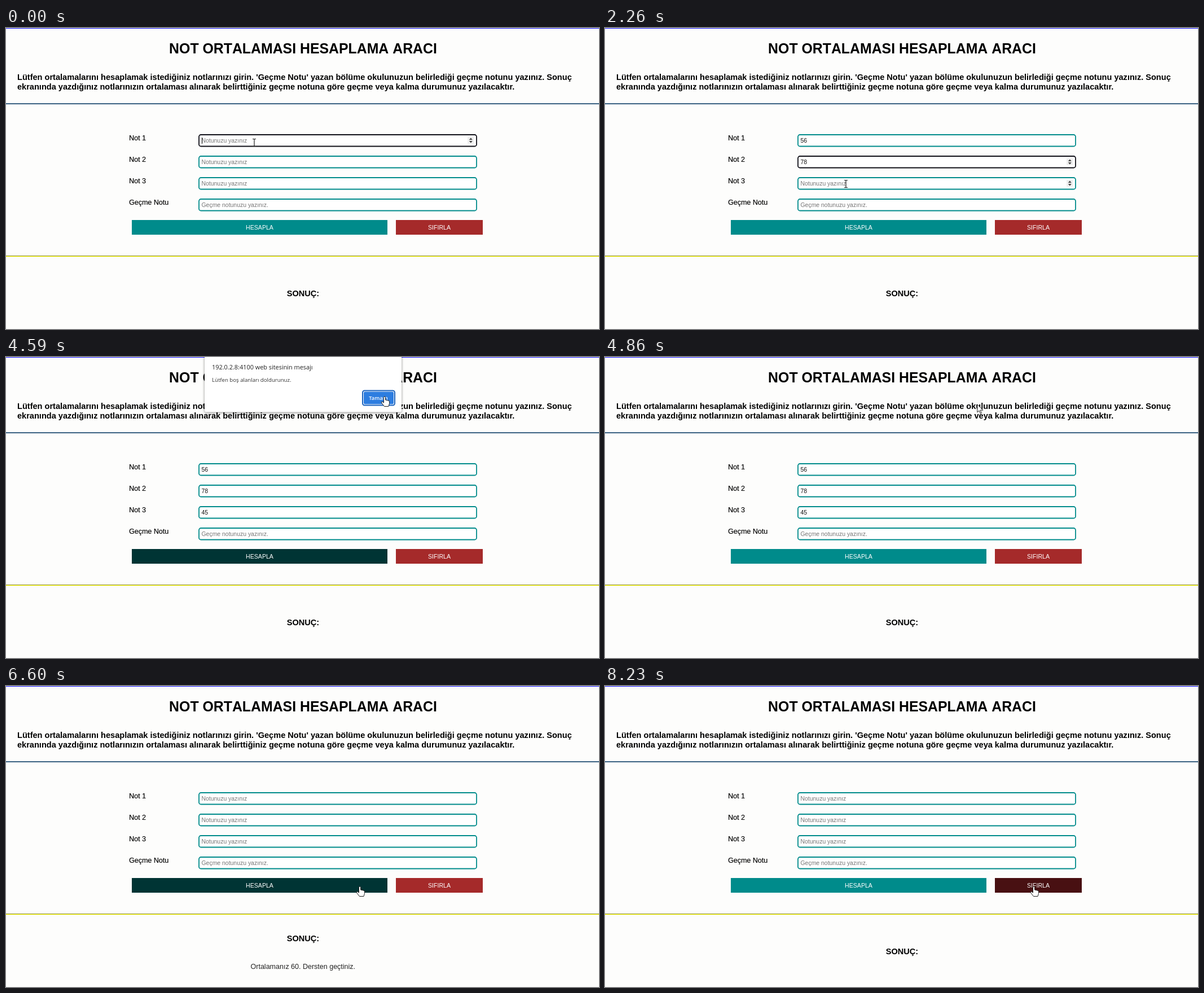
These frames come from a looping animation (1051 by 533 pixels, 8.34 s). An HTML page:

```html
<!DOCTYPE html>
<html lang="tr">
<head>
<meta charset="utf-8">
<style>
  html, body { margin: 0; width: 100%; height: 100%; overflow: hidden; background: #fdfdfc; }
  svg { display: block; font-family: "Liberation Sans", Arial, sans-serif; }
  h1, .bold { font-weight: bold; }
  .title { font-size: 24.85px; font-kerning: none; }
  .lead { font-size: 14.57px; }
  .body { font-size: 12.5px; }
  .label { text-shadow: .4px .4px .5px #0006; }
  .input { font-size: 10.45px; }
  .button { font-size: 10.6px; fill: #fff; }
  .mid { text-anchor: middle; }
  .dialog { font-family: "Open Sans", "Noto Sans", sans-serif; }
</style>
</head>
<body>
<svg width="1051" height="533" viewBox="0 0 1051 533">
  <rect width="1051" height="1" fill="#1414ff"/>
  <text class="title bold mid" x="526.5" y="45">NOT ORTALAMASI HESAPLAMA ARACI</text>
  <g class="lead bold">
    <text x="20" y="92">Lütfen ortalamalarını hesaplamak istediğiniz notlarınızı girin. 'Geçme Notu' yazan bölüme okulunuzun belirlediği geçme notunu yazınız. Sonuç</text>
    <text x="20" y="109">ekranında yazdığınız notlarınızın ortalaması alınarak belirttiğiniz geçme notuna göre geçme veya kalma durumunuz yazılacaktır.</text>
    <text id="heading" class="mid" x="526.5" y="475">SONUÇ:</text>
  </g>
  <rect y="133.4" width="1051" height="1.6" fill="#0b3c66"/>
  <g id="rows"></g>
  <rect id="calc" x="223" y="340" width="453" height="26"/>
  <rect id="reset" x="691" y="340" width="154" height="26"/>
  <text class="button mid" x="449.5" y="356.6">HESAPLA</text>
  <text class="button mid" x="768" y="356.6">SIFIRLA</text>
  <rect y="403" width="1051" height="1" fill="#8c8c46"/>
  <rect y="404" width="1051" height="1" fill="#ff0"/>
  <text id="result" class="body mid" x="526.3" y="500.5" fill="#222">Ortalamanız 60. Dersten geçtiniz.</text>
  <g id="dialog" class="dialog">
    <rect x="352" y="-8" width="349" height="105.5" rx="3" fill="#fff" style="filter:drop-shadow(0 1px 2px #0007)"/>
    <text x="365" y="22" font-size="10.9" fill="#222">192.0.2.8:4100 web sitesinin mesajı</text>
    <text x="365" y="43.5" font-size="9.65" fill="#333">Lütfen boş alanları doldurunuz.</text>
    <rect x="632" y="59.5" width="57" height="26" rx="3.5" fill="#fff" stroke="#1b62bd" stroke-width="2"/>
    <rect x="634" y="61.5" width="53" height="22" rx="2" fill="#2d7de0"/>
    <text class="mid" x="660" y="76" font-size="9.4" font-weight="600" fill="#fff">Tamam</text>
  </g>
  <path id="pointer" stroke-linejoin="round"/>
</svg>
<script>
const LOOP = 8340;
const $ = id => document.getElementById(id);
const show = (el, on) => el.setAttribute('visibility', on ? 'visible' : 'hidden');
const DIGIT = 10.45 * .556;

// [time, field, digit]
const KEYS = [[260, 0, 5], [520, 0, 6], [1450, 1, 7], [1710, 1, 8],
              [2770, 2, 4], [3020, 2, 5], [5850, 3, 5], [5940, 3, 0]];
// [time, focused field or -1]
const FOCUS = [[0, 0], [1110, 1], [2340, 2], [3580, -1], [5420, 3], [6320, -1]];
// [start, end, x, y, steps]
const MOVES = [[600, 1030, 434, 240, 5], [1800, 2260, 427, 276, 5], [3100, 3490, 482, 345, 5],
               [3950, 4590, 671, 70, 7], [4780, 5340, 470, 322, 7], [6010, 6170, 482, 347, 2],
               [6420, 6600, 627, 355, 2], [6690, 6830, 760, 355, 2]];
const ALERT = [3860, 4680, 4780], SUBMIT = 6320, RESET = 7420;

const CURSORS = {
  beam: ['M-3 -6.5H-1Q0 -6.5 0 -5.5Q0 -6.5 1 -6.5H3M0 -5.5V5.5M-3 6.5H-1Q0 6.5 0 5.5Q0 6.5 1 6.5H3', 'none', '#222', 1.2],
  hand: ['M-1.5 9V1.5a1.5 1.5 0 0 1 3 0V6l5.5 1.2q1.5 .4 1.5 2v3.3L7 17.5H-.5L-5.5 11q-.5-2 1.3-2l2.7 2z', '#fff', '#222', 1],
  arrow: ['M0 0V14l3.2-3 2.3 5 2-1-2.2-4.8H10Z', '#fff', '#222', 1]
};

const rows = ['Not 1', 'Not 2', 'Not 3', 'Geçme Notu'].map((label, i) => {
  const hint = i < 3 ? 'Notunuzu yazınız' : 'Geçme notunuzu yazınız.';
  const g = document.createElementNS('http://www.w3.org/2000/svg', 'g');
  g.setAttribute('transform', `translate(0 ${i * 38})`);
  g.innerHTML = `
    <text class="body label" x="218" y="199">${label}</text>
    <rect x="342" y="189" width="492" height="20.5" rx="3.5" fill="#fff" stroke-width="1.8"/>
    <text class="input" x="346.5" y="203"></text>
    <path d="M0 194V205" stroke="#000"/>
    <g><rect x="818" y="193" width="11.5" height="12" fill="#efefef"/>
    <path d="M820.8 198L823.8 194.6L826.8 198ZM820.8 200L823.8 203.4L826.8 200Z" fill="#444"/></g>`;
  const [, box, text, caret, spinner] = g.children;
  $('rows').append(g);
  return { hint, box, text, caret, spinner };
});

function pointerAt(t) {
  let x = 440, y = 203;
  for (const [start, end, toX, toY, steps] of MOVES) {
    if (t < start) break;
    const p = Math.min(1, Math.floor((t - start) / (end - start) * steps + .001) / steps);
    const e = p * p * (3 - 2 * p);
    x += (toX - x) * e;
    y += (toY - y) * e;
  }
  return [x, y];
}

const inside = (x, y, left, top, w, h) => x >= left && x <= left + w && y >= top && y <= top + h;

function render(t) {
  const [x, y] = pointerAt(t);
  const modal = t >= ALERT[0] && t < ALERT[1];
  const [focusTime, focus] = FOCUS.filter(f => f[0] <= t).pop();
  let hoveredField = false;

  rows.forEach((row, i) => {
    const typed = KEYS.filter(k => k[1] === i && k[0] <= t);
    const value = t < SUBMIT ? typed.map(k => k[2]).join('') : '';
    const focused = focus === i;
    const hovered = !modal && inside(x, y, 341, 188 + i * 38, 494, 23);
    const lastInput = typed.length ? typed[typed.length - 1][0] : focusTime;
    const caretOn = (t - Math.max(focusTime, lastInput)) % 1060 < 530;
    hoveredField ||= hovered;
    row.text.textContent = value || row.hint;
    row.text.setAttribute('fill', value ? '#111' : '#757575');
    row.box.setAttribute('stroke', focused ? '#101018' : '#008b8b');
    row.caret.setAttribute('transform', `translate(${347.5 + value.length * DIGIT} 0)`);
    show(row.caret, focused && caretOn);
    show(row.spinner, focused || hovered);
  });

  const overCalc = modal || inside(x, y, 223, 340, 453, 26);
  const overReset = !modal && inside(x, y, 691, 340, 154, 26);
  $('calc').setAttribute('fill', overCalc ? '#003434' : '#008b8b');
  $('reset').setAttribute('fill', overReset ? '#481012' : '#a52a2a');

  const done = t >= SUBMIT && t < RESET;
  $('heading').setAttribute('y', done ? 452 : 475);
  show($('result'), done);
  show($('dialog'), t >= ALERT[0] && t < ALERT[2]);
  $('dialog').setAttribute('opacity', modal ? 1 : .5);

  const onButton = modal ? inside(x, y, 631, 58, 59, 28) || t < MOVES[3][0] : overCalc || overReset;
  const [d, fill, stroke, width] = CURSORS[onButton ? 'hand' : hoveredField ? 'beam' : 'arrow'];
  const attrs = { d, fill, stroke, 'stroke-width': width, transform: `translate(${x} ${y})` };
  for (const name in attrs) $('pointer').setAttribute(name, attrs[name]);
}

const begin = performance.now();
function tick() {
  render((performance.now() - begin) % LOOP);
  requestAnimationFrame(tick);
}
tick();
</script>
</body>
</html>
```
